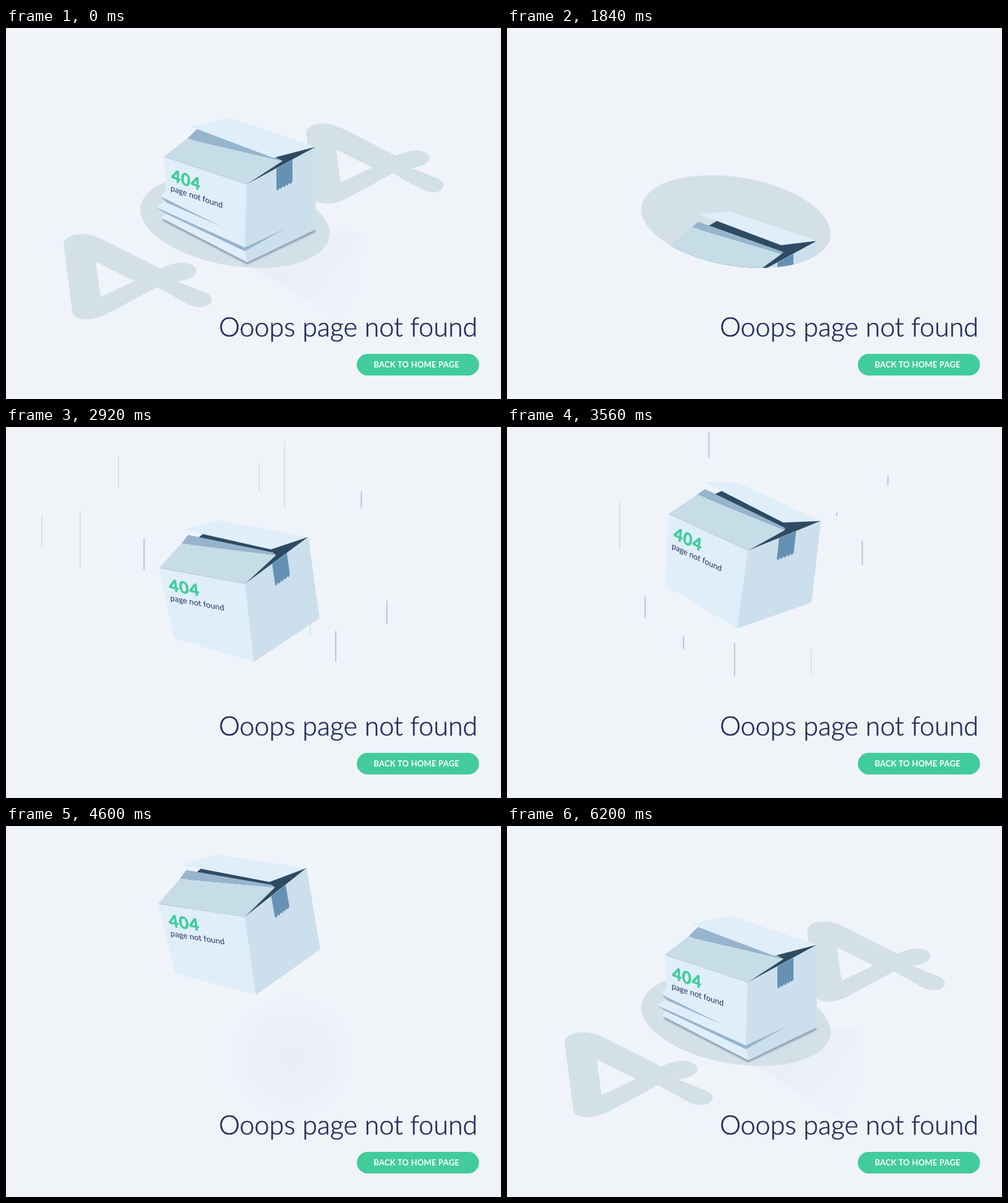
Recreate the animation shown at these times as an HTML page. Size 800x600 px, loop 6.8 s.

```html
<!DOCTYPE html>
<html lang="en">
<head>
<meta charset="utf-8">
<title>Page not found</title>
<style>
html, body { margin: 0; width: 100%; height: 100%; overflow: hidden; background: #f0f4f9; }
svg { display: block; width: 800px; height: 600px; }
text { font-family: Lato, "Open Sans", sans-serif; }
</style>
</head>
<body>
<svg viewBox="0 0 800 600">
  <defs>
    <linearGradient id="cast" gradientUnits="userSpaceOnUse" x1="430" y1="330" x2="570" y2="440">
      <stop offset="0" stop-color="#dfe8ef"/>
      <stop offset="1" stop-color="#e9eef7" stop-opacity=".5"/>
    </linearGradient>
    <radialGradient id="haze">
      <stop offset="0" stop-color="#eaeef6"/>
      <stop offset=".6" stop-color="#ecf0f6"/>
      <stop offset="1" stop-color="#eef2f9" stop-opacity=".4"/>
    </radialGradient>
    <filter id="soft" x="-20%" y="-20%" width="140%" height="140%"><feGaussianBlur stdDeviation="1.6"/></filter>
    <ellipse id="disc" cx="370" cy="313" rx="154.6" ry="71.6" transform="rotate(9.3 370 313)"/>
    <clipPath id="hole">
      <path d="M217 293V-500H523V333Z"/>
      <use href="#disc"/>
    </clipPath>
    <path id="four" fill-rule="evenodd" d="M93 349C95 338 108 334 122 333.5C134 333.5 144 336 154 341L250 389
      C262 383 274 379 288 380C301 381 307 386 307.5 393C307 402 296 407 276 410L320 427C330 431 334 436 332 442
      C328 451 317 453 303 450Q296 448 289 444L244 419L164 462C150 469 137 472 126 471C114 470 108 466 107 458Z
      M145 378L153 435L208 409Z"/>
  </defs>
  <g id="streaks" stroke-width="2"></g>
  <circle id="blob" cx="462" cy="374" r="98" fill="url(#haze)"/>
  <path id="castShadow" d="M398 386L501 326L575 330L570 420L540 474Z" fill="url(#cast)" filter="url(#soft)"/>
  <g id="ground" fill="#d3e0e7">
    <use href="#disc"/>
    <g id="fourLeft"><use href="#four"/></g>
    <g id="fourRight"><use href="#four" transform="translate(485 155) scale(.929 .942) translate(-93 -334)"/></g>
  </g>
  <g id="clip">
    <g id="box">
      <path id="contact" d="M254 310L390 380L500 328" fill="none" stroke="#414b78" stroke-width="3" filter="url(#soft)"/>
      <path fill="#2f4b63" d="M256 209L361 147L500 192.500L389 253Z"/>
      <path id="inner" fill="#97b4ce"/>
      <path id="left" fill="#e0eefa"/>
      <path id="right" fill="#cbdfed"/>
      <path id="frontFlap" fill="#c6dce7"/>
      <path id="backFlap" fill="#e0eefa"/>
      <path id="tape" fill="#6791b2"/>
      <g id="folds" fill="#97b4ce">
        <path d="M251 273L350 322L259 282Z"/>
        <path d="M243 290L386 355L452 324L386 361L256 299Z"/>
      </g>
      <text transform="matrix(.95 .32 -.02 1 267 247)" font-size="27" font-weight="700" letter-spacing="1" fill="#42cc9b" stroke="#42cc9b" stroke-width=".8">404</text>
      <text transform="matrix(.95 .32 -.02 1 266 263)" font-size="13.3" fill="#2b3060">page not found</text>
    </g>
  </g>
  <g fill="#232c5c" stroke="#232c5c" stroke-width=".6">
    <text x="762" y="499" text-anchor="end" font-size="43" font-weight="300">Ooops page not found</text>
  </g>
  <rect x="567" y="527" width="197.5" height="35" rx="17.5" fill="#42cc9b"/>
  <text x="663.5" y="549" text-anchor="middle" font-size="13" font-weight="700" letter-spacing=".2" fill="#fff">BACK TO HOME PAGE</text>
</svg>
<script>
const LOOP = 6800;
const $ = id => document.getElementById(id);
const set = (id, name, value) => $(id).setAttribute(name, value);
const clamp = u => Math.max(0, Math.min(1, u));
const span = (t, from, to) => clamp((t - from) / (to - from));
const ramp = (t, from, to) => (1 - Math.cos(Math.PI * span(t, from, to))) / 2;
const mix = (a, b, u) => a.map((v, i) => v + (b[i] - v) * u);
const list = (n, make) => Array.from({ length: n }, (_, i) => make(i));
const shape = (id, points) => set(id, 'd', 'M' + points.map(p => p.map(v => v.toFixed(2))).join('L') + 'Z');

// Corners of the box
const topLeft = [255, 208], topFront = [389, 253], topRight = [501, 192], topBack = [361, 145];
const lowLeft = [262.5, 324], lowFront = [385.5, 380], lowRight = [500.5, 325];

function drawSides(crush) {
  const pleats = list(6, i => mix(
    mix(topLeft, lowLeft, .45 + .11 * i),
    [258 - (i % 2) * (15 - 4 * Math.abs(i - 3)), 262 + 9 * i],
    crush));
  const bend = mix(mix(topFront, lowFront, .8), [386, 356], crush);
  const foot = mix(lowFront, [390, 379], crush);
  shape('left', [topLeft, topFront, bend, foot, ...pleats.reverse()]);
  shape('right', [topFront, topRight, lowRight, foot, bend]);
}

function drawFlaps(open) {
  const tip = mix([293, 179], [299, 170], open), end = mix([447, 215], [444, 213], open);
  const rimStart = mix([309, 163], [309, 161], open), rimEnd = mix([434, 208], [447, 210], open);
  shape('inner', [tip, rimStart, rimEnd, end]);
  shape('frontFlap', [topLeft, tip, end, topFront]);
  shape('backFlap', [mix([297, 159], [308, 148], open), topBack, topRight, mix([432, 210], [443, 199], open)]);
}

const torn = list(11, i => [463 - 2.6 * i, 251 + 1.3 * i - (i % 2 ? 0 : 3)]);
shape('tape', [[437, 227], [463, 213], ...torn]);

let seed = 11;
const random = () => (seed = seed * 16807 % 2147483647) / 2147483647;

const streaks = list(13, i => {
  const x = 58 + Math.round(27 * (i / 12) ** .85) * 20.65;
  const node = document.createElementNS('http://www.w3.org/2000/svg', 'line');
  node.setAttribute('x1', x);
  node.setAttribute('x2', x);
  node.setAttribute('stroke', i % 7 > 2 ? '#bfc4d0' : '#c5e9e0');
  $('streaks').append(node);
  const inward = 1 - Math.abs(x - 400) / 350;
  return { node, phase: random(), half: 15 + 50 * random(), y: 90 + 350 * inward * random() };
});

// Streaks rise past the box, growing and then shrinking
function drawStreaks(t) {
  set('streaks', 'opacity', t > 2060 && t < 4560 ? 1 : 0);
  for (const { node, phase, half, y } of streaks) {
    const u = (t / 900 + phase) % 1;
    const middle = y + 150 - 300 * u;
    const reach = half * Math.sin(Math.PI * u) * (1 - ramp(t, 4200, 4560));
    node.setAttribute('y1', middle - reach);
    node.setAttribute('y2', middle + reach);
  }
}

function boxHeight(t) {
  if (t < 2070) return 151 * (Math.max(0, t - 1600) / 240) ** 2;
  const entry = -420 * (1 - ramp(t, 2080, 2480));
  const drift = 4 - 108 * ramp(t, 2800, 4250);
  return (entry + drift) * (1 - span(t, 4960, 5250) ** 2);
}

function drawBox(t) {
  const flying = ramp(t, 2080, 2400) * (1 - ramp(t, 4700, 5120));
  const sway = -(4.86 + t / 930) * Math.cos(2 * Math.PI * (t - 2920) / 1680) * flying;
  const flutter = 1 - flying * .3 + sway * .015;
  set('box', 'transform', `translate(${-flying} ${boxHeight(t)}) rotate(${sway} 378 265)`);
  set('clip', 'clip-path', t > 1580 && t < 2070 ? 'url(#hole)' : 'none');

  const crush = 1 - ramp(t, 1380, 1580) + ramp(t, 5240, 5340);
  drawSides(crush);
  drawFlaps(flutter * ramp(t, 1440, 1800) * (1 - ramp(t, 5160, 5320)));
  set('folds', 'opacity', crush);
}

function drawGround(t) {
  const shade = 1 - ramp(t, 1360, 1520) + ramp(t, 5220, 5360);
  set('contact', 'opacity', shade * .6);
  set('castShadow', 'opacity', shade * .5);
  set('blob', 'opacity', ramp(t, 4300, 4600) * (1 - ramp(t, 5180, 5300)));

  const scale = 1 - ramp(t, 1920, 2060) + ramp(t, 5200, 5340);
  set('ground', 'transform', `translate(370 313) scale(${scale}) translate(-370 -313)`);
  set('ground', 'visibility', scale > .001 ? 'visible' : 'hidden');

  // Negative slides the digits off stage, positive tucks them under the box
  const slide = t < 3000 ? -2.6 * span(t, 1360, 1800) ** 2 : 1.08 * (1 - ramp(t, 5400, 5820));
  set('fourLeft', 'transform', `translate(${140 * slide} ${-86 * slide})`);
  set('fourRight', 'transform', `translate(${-179 * slide} ${67 * slide})`);
}

const start = performance.now();
function frame() {
  const t = (performance.now() - start) % LOOP;
  drawStreaks(t);
  drawGround(t);
  drawBox(t);
  requestAnimationFrame(frame);
}
frame();
</script>
</body>
</html>
```
